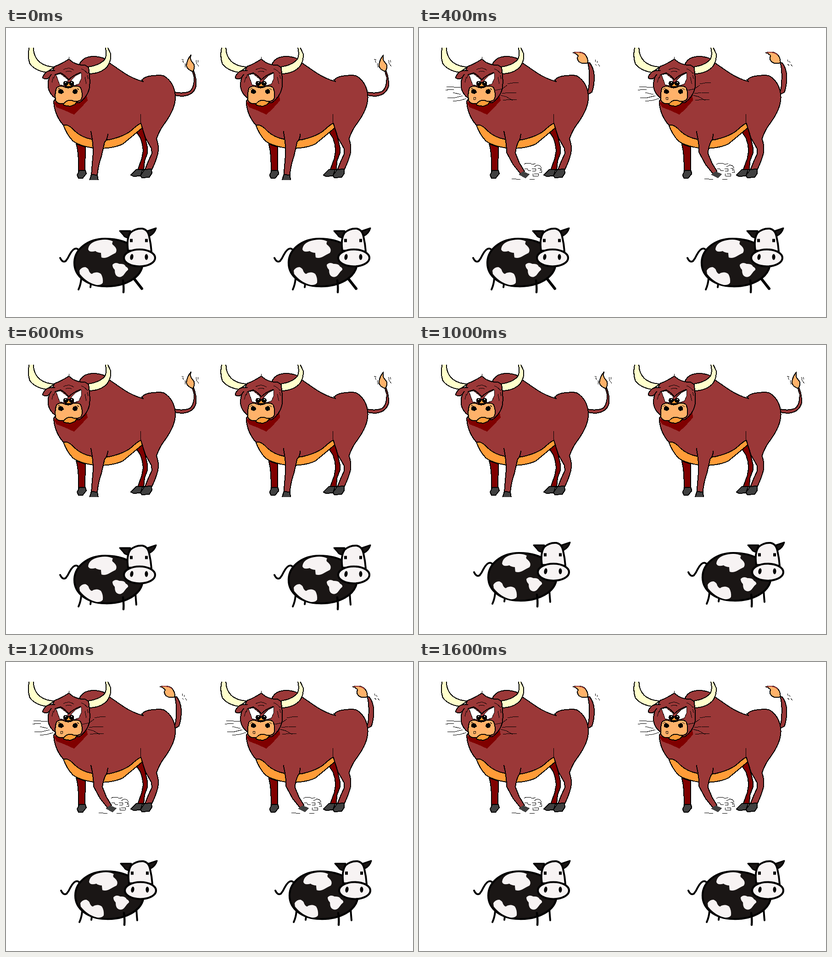
An HTML page for the animation above (1800 ms loop, 887 by 631 pixels).

```html
<!DOCTYPE html>
<html lang="en">
<head>
<meta charset="utf-8">
<title>Bulls and cows</title>
<style>
  html, body { margin: 0; width: 100%; height: 100%; overflow: hidden; background: #fff; }
  svg { display: block; width: 887px; height: 631px; }
  #bull { stroke: #000; stroke-width: 2; stroke-linejoin: round; shape-rendering: crispEdges; }
  #cow { stroke: #000; stroke-width: 4.2; stroke-linejoin: round; stroke-linecap: round; }
  .hide { fill: #9b3838; }
  .dark { fill: #800000; }
  .belly { fill: #ff9c38; }
  .skin { fill: #ffb26a; }
  .horn { fill: #ffffcc; }
  .hoof { fill: #404040; }
  .line { fill: none; stroke-width: 1; }
  .ink { fill: #1a1615; }
  .milk { fill: #f7f3f3; }
  .patch { fill: #f7f3f3; stroke: none; }
</style>
</head>
<body>
<svg viewBox="0 0 887 631">
  <clipPath id="crop"><rect x="40" y="43" width="390" height="289"/></clipPath>

  <g id="bull" clip-path="url(#crop)">
    <g class="rest">
      <path class="hide" d="M367 140Q387 144 401 138Q411 128 410 107L406 94L409 94Q416 112 414 128Q408 148 383 149L367 147"/>
      <path class="skin" d="M403 59Q395 68 393 82Q395 91 407 95Q412 88 410 80L404 72Q401 67 403 59Z"/>
      <path class="line" d="M383 68l4 2M385 71l2 5M390 77l1 9M414 70l2 9M418 70l1 5M417 79l3 5"/>
    </g>
    <g class="paw">
      <path class="hide" d="M366 144Q371 132 371 113Q372 92 368 76L372 76Q381 87 382 105Q382 126 377 140L368 145"/>
      <path class="skin" d="M336 54Q352 50 361 57Q369 65 368 76Q356 80 348 73Q343 66 347 61Q342 55 336 54Z"/>
      <path d="M338 54Q354 51 362 59" fill="none" stroke="#9b3838"/>
      <path class="line" d="M384 69l1 5M388 72l1 4M384 79l3 3M391 79l3 5"/>
    </g>

    <path class="dark" d="M153 253Q159 273 158 313H172L173 260ZM283 225L293 240L297 253L299 268L296 285L287 310H300L302 290L308 274L308 260L303 238L297 218Z"/>
    <path class="hoof" d="M160 311L155 321L158 328H167L175 318L173 311ZM284 309L272 321L278 324L293 323L298 309Z"/>

    <path class="hide" d="M104 160Q105 185 120 206L125 212Q132 232 146 247Q165 260 200 263Q235 263 255 253Q278 234 297 218L304 240L317 263L318 274Q310 290 303 309H318Q327 290 331 274Q334 258 328 242Q335 222 346 208Q370 175 369 150Q368 120 345 105Q338 102 322 104Q302 105 296 114L299 117Q276 111 254 96L228 78L213 66Q190 58 172 66Q164 71 160 79Z"/>
    <path class="hoof" d="M302 309L293 322L296 327L312 326L318 317L317 308Z"/>
    <path class="belly" d="M125 212Q136 209 150 225Q165 239 187 243Q205 247 225 244Q260 236 275 222Q288 210 294 208L297 218Q278 234 255 253Q235 263 200 263Q165 260 146 247Q132 232 125 212Z"/>
    <path class="line" d="M293 188V210M294 112L299 118"/>
    <path class="dark" style="stroke:none" d="M104 162L110 173L128 180L148 189L161 177L178 158L176 148L150 160Z"/>

    <g class="rest">
      <path class="hide" d="M185 225Q190 250 190 272L186 321H199Q201 300 208 280L215 249Q221 244 222 231"/>
      <path class="hoof" d="M186 320L182 333H201L199 321Z"/>
    </g>
    <g class="paw">
      <path class="hide" d="M185 225Q191 250 191 272L205 298L221 318L230 313L219 295L210 273Q213 252 220 243L222 231"/>
      <path class="hoof" style="stroke:none" d="M217 320L227 313L241 319L232 328Z"/>
      <path class="line" d="M229 298l4-3h9l5 3l7-2M230 307h6l2 4h6M246 307h8v5h-7M251 303l7-4l6 2l3 5M259 306h5v6M262 315h6l-2-8M248 318v5h12v-5h-9M202 329l10 1h9M241 330l11 1"/>
    </g>

    <path class="horn" d="M51 41Q46 61 52 78Q63 93 88 97L106 85Q88 85 74 75Q59 62 60 41ZM216 41Q221 58 215 69Q203 82 178 85L182 100Q207 99 220 85Q230 72 228 56L221 41Z"/>
    <path class="hide" d="M106 84Q117 80 127 74L137 68L146 75Q160 82 172 81L180 86Q184 112 182 130Q178 150 160 163L125 164Q95 150 92 130Q90 115 97 102Z"/>
    <path class="hide" d="M107 93Q92 92 87 97Q80 104 80 109Q88 114 94 108L99 101"/>
    <path class="line" d="M137 63V68M103 107l-3 12M107 101l-3 9M172 107l3 15M177 103l2 8M164 89q8 3 13 10l5-2M125 91q11-7 23 1M130 96q7-4 13 0"/>
    <path fill="#fff" style="stroke-width:1" d="M109 102L119 100L134 112L135 122L126 126L117 124ZM164 98L164 111L159 122L148 126L142 114L152 104Z"/>
    <path d="M107 102L119 98Q129 103 137 113Q146 103 163 97" fill="none"/>
    <path class="belly" d="M129 128L137 119L145 128Z"/>
    <circle cx="130" cy="121" r="4.500"/><circle cx="143" cy="121" r="4.500"/>
    <path d="M129 119h2M142 119h2" stroke="#fff"/>
    <path class="belly" d="M123 164L135 158H157L150 167L140 171L127 169Z"/>
    <path class="skin" d="M110 131Q118 124 128 129Q137 133 147 127Q158 125 163 131Q169 149 163 157Q154 163 143 158Q134 156 126 165Q112 167 108 158Q106 143 110 131Z"/>
    <path d="M115 137l3-3l5 2l2 4l-4 3l-6-2ZM147 136l5-2l3 3l-1 5l-5 1l-3-3Z"/>
    <path class="line" d="M113 134l4-3M155 132l4 3"/>

    <g class="paw">
      <path class="line" d="M60 128L76 129L90 130M58 136L67 134L76 134M74 141L91 145M62 152L79 152L95 148M74 160L90 158L103 154M193 122L204 120L217 119M166 136L181 133L192 125M181 143L196 141L212 142M178 147L190 150L204 158M183 158L198 156L213 157M119 151h4v5h-4z"/>
    </g>
  </g>
  <use href="#bull" x="419.5"/>

  <g id="cow">
    <path fill="none" d="M118 502Q123 513 130 509Q135 503 138 496Q147 479 155 482Q159 484 159 488" stroke-width="4"/>
    <path fill="none" d="M164 547Q163 560 158 571M185 559L184 566" stroke-width="4"/>
    <path id="kick" fill="none" d="M278 546L296 569" stroke-width="6"/>
    <path id="stand" fill="none" d="M282 541Q283 556 284 567" stroke-width="4"/>
    <path class="ink" d="M149 513C149 482 180 460 216 460C262 460 298 482 298 514C296 546 258 565 216 564C176 563 149 542 149 513Z"/>
    <path class="patch" d="M179 483Q181 467 205 463Q222 460 233 466Q229 472 235 475Q244 483 239 491Q231 495 226 498Q216 504 208 501Q207 494 207 491Q198 490 195 487Q181 491 179 483Z"/>
    <path class="patch" d="M232 517Q238 510 247 515Q258 514 261 521Q267 524 266 528Q261 532 258 537Q252 546 244 543Q237 541 237 528Q232 523 232 517Z"/>
    <path class="patch" d="M160 530Q164 522 173 522Q180 525 181 531Q186 540 190 535Q200 531 207 537Q212 545 211 556Q208 562 197 561Q176 556 161 537Z"/>
    <path fill="none" d="M255 551Q257 565 256 577" stroke-width="4.500"/>
    <path class="ink" d="M248 443L271 443L266 458Q258 457 256 452ZM306 444L327 437Q324 448 313 454Z" stroke-width="3"/>
    <path class="milk" d="M266 486Q262 460 271 447Q282 437 297 438Q309 440 312 455Q316 472 317 488Z" stroke-width="4"/>
    <ellipse class="milk" cx="291" cy="502" rx="34" ry="18.500"/>
    <path d="M273 463.500v1M306 463.500v1" stroke-width="6" stroke-linecap="square"/>
    <ellipse cx="274" cy="500" rx="3.500" ry="6.500" stroke="none" transform="rotate(10 274 500)"/>
    <ellipse cx="306" cy="500" rx="3.500" ry="6.500" stroke="none"/>
  </g>
  <use href="#cow" x="467"/>
</svg>
<script>
  const STEP = 200;
  // Per step: is the bull pawing, is the cow kicking, and the cow's hop [dx, dy].
  const steps = [
    [0, 1, 0, 0], [0, 0, 0, 0], [1, 1, 0, 0],
    [0, 0, 0, 0], [1, 0, 2.5, -9], [0, 0, 2, -6],
    [1, 0, 2, -3], [0, 0, 2, -6], [1, 0, 2, -3]
  ];
  const byId = id => document.getElementById(id);
  const show = (el, on) => el.setAttribute('display', on ? 'inline' : 'none');
  const rest = document.querySelectorAll('#bull .rest');
  const paw = document.querySelectorAll('#bull .paw');
  const start = performance.now();
  let current = -1;

  function draw(now) {
    const i = Math.floor(Math.max(0, now - start) / STEP) % steps.length;
    if (i !== current) {
      current = i;
      const [pawing, kicking, dx, dy] = steps[i];
      rest.forEach(el => show(el, !pawing));
      paw.forEach(el => show(el, pawing));
      show(byId('kick'), kicking);
      show(byId('stand'), !kicking);
      byId('cow').setAttribute('transform', `translate(${dx} ${dy})`);
    }
    requestAnimationFrame(draw);
  }
  draw(start);
</script>
</body>
</html>
```
